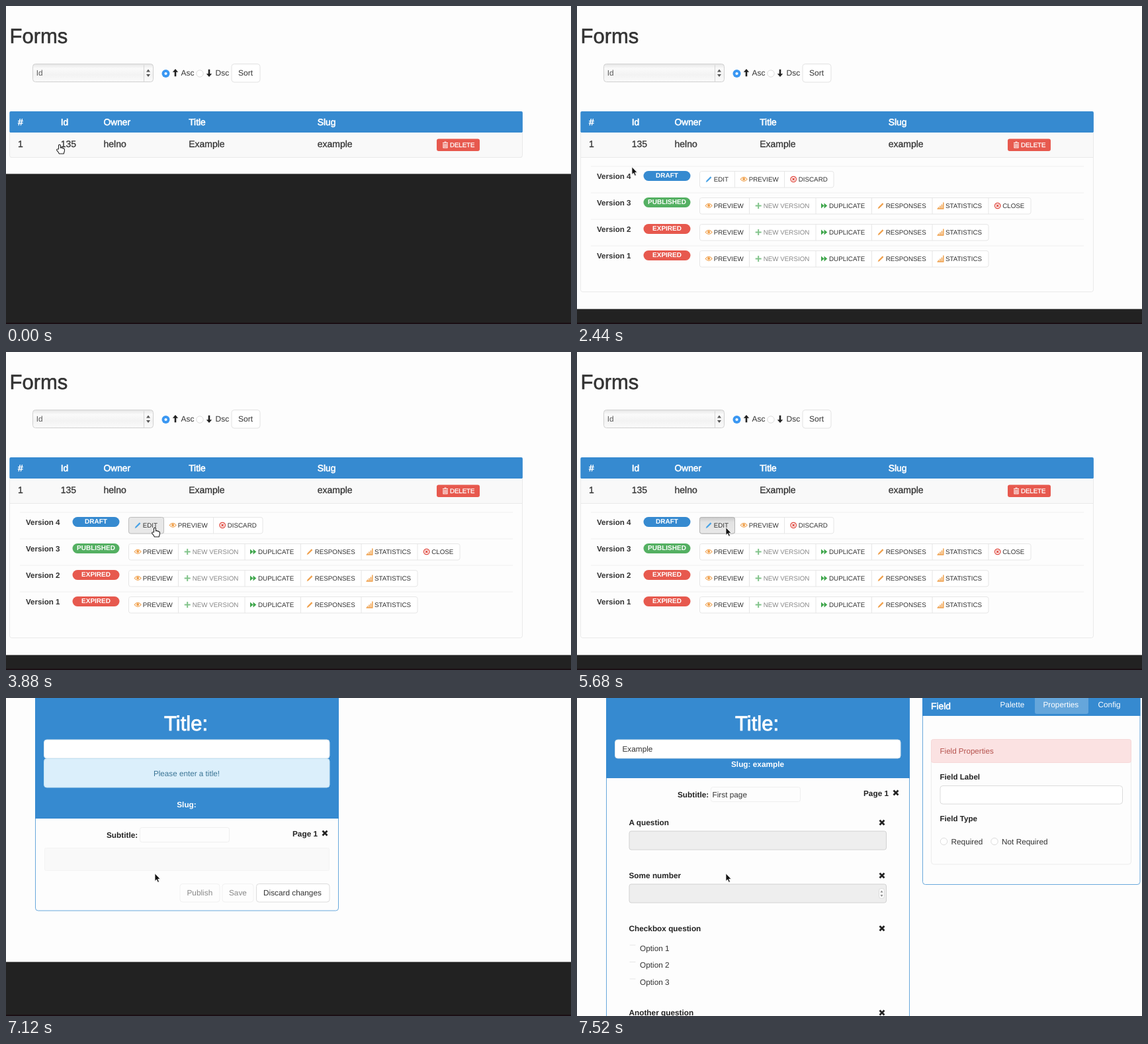
Recreate the animation shown at these times as an HTML page. Size 854 by 480 pixels, loop 8 s.

```html
<!DOCTYPE html>
<html lang="en">
<head>
<meta charset="utf-8">
<title>Form versions</title>
<style>
  html, body { margin: 0; width: 100%; height: 100%; overflow: hidden; background: #222; }
  #stage { position: relative; width: 854px; height: 480px; overflow: hidden; }
  .scene { position: absolute; inset: 0; background: linear-gradient(#222 478px, #1b0f14 478px); }
  .page { position: absolute; left: 0; top: 0; width: 854px; background: #fdfdfd; border-bottom: 1px solid #777; overflow: hidden; }
  svg { position: absolute; left: 0; top: 0; display: block; overflow: visible; filter: blur(.35px); }
  text { font-family: "Liberation Sans", Arial, sans-serif; white-space: pre; text-rendering: geometricPrecision; }

  .scene, .side, .hover, .pressed, .hand, .arrow { animation: 8s step-end infinite; }
  #list { animation-name: list; }
  #empty { animation-name: empty; }
  #filled { animation-name: filled; }
  .side { animation-name: side; }
  .hover { animation-name: hover; }
  .pressed { animation-name: pressed; }
  .hand { animation-name: hand; }
  .arrow { animation-name: arrow; }
  @keyframes list { 0% { opacity: 1 } 77%, 100% { opacity: 0 } }
  @keyframes empty { 0% { opacity: 0 } 89%, 100% { opacity: 1 } }
  @keyframes side { 0% { opacity: 0 } 89.5%, 100% { opacity: 1 } }
  @keyframes filled { 0% { opacity: 0 } 92%, 100% { opacity: 1 } }
  @keyframes hover { 0% { opacity: 0 } 46.5%, 100% { opacity: 1 } }
  @keyframes pressed { 0% { opacity: 0 } 59.5%, 100% { opacity: 1 } }
  @keyframes hand { 0% { opacity: 1 } 6% { opacity: 0 } 46.5% { opacity: 1 } 61.5%, 100% { opacity: 0 } }
  @keyframes arrow { 0% { opacity: 0 } 6% { opacity: 1 } 46.5% { opacity: 0 } 61.5%, 100% { opacity: 1 } }

  #list .page { animation: page 8s ease infinite; }
  .panel { position: absolute; left: 5px; top: 191px; width: 776px; border-radius: 0 0 4px 4px; overflow: hidden; animation: panel 8s ease infinite; }
  .panel::after { content: ""; position: absolute; inset: 0; border: 1px solid #eaeaea; border-top: 0; border-radius: 0 0 4px 4px; }
  @keyframes page { 0%, 5.6% { height: 253px } 10.4%, 100% { height: 457px } }
  @keyframes panel { 0%, 5.6% { height: 38px } 10.4%, 100% { height: 241px } }

  #cursor { animation: move 8s linear infinite; }
  @keyframes move {
    0%, 1% { transform: translate(81px, 209px) }
    4%, 19% { transform: translate(91px, 207px); animation-timing-function: ease-in-out }
    26%, 28% { transform: translate(89px, 252px) }
    30.5% { transform: translate(83px, 243px) }
    34.5% { transform: translate(52px, 258px); animation-timing-function: ease-out }
    38.5%, 39% { transform: translate(31px, 290px); animation-timing-function: ease-in }
    43.75% { transform: translate(105px, 294px); animation-timing-function: ease-out }
    48.5%, 100% { transform: translate(225px, 265px) }
  }
</style>
</head>
<body>
<div id="stage">
  <div class="scene" style="animation: none"><div class="page" style="height: 407px"></div></div>
  <div class="scene" id="empty"><div class="page" style="height: 398px"></div><svg width="854" height="480"></svg></div>
  <div class="scene" id="filled"><div class="page" style="height: 480px"></div><svg width="854" height="480"></svg></div>
  <svg class="side" width="854" height="480"></svg>
  <div class="scene" id="list">
    <div class="page">
      <svg class="top" width="854" height="480"></svg>
      <div class="panel"><svg class="rows" width="776" height="241" viewBox="5 191 776 241"></svg></div>
    </div>
  </div>
  <svg width="854" height="480">
    <defs>
      <linearGradient id="gloss" x2="0" y2="1">
        <stop offset="0" stop-color="#e6e6e6"/><stop offset=".25" stop-color="#fafafa"/>
        <stop offset=".6" stop-color="#f3f3f3"/><stop offset="1" stop-color="#fafafa"/>
      </linearGradient>
      <linearGradient id="inset" x2="0" y2="1">
        <stop offset="0" stop-color="#cacaca"/><stop offset=".3" stop-color="#e3e3e3"/><stop offset="1" stop-color="#e8e8e8"/>
      </linearGradient>
      <path id="pencil" d="M-4.5 4.8 -3.5 2 2.6-4.2 4.2-2.6-1.9 3.6Z" fill="currentColor"/>
      <g id="eye" fill="none" stroke="currentColor"><path d="M-5 0Q0-6.5 5 0 0 6 -5 0Z" stroke-width="1.1"/><circle r="1.6" cy="-.3" fill="currentColor"/></g>
      <path id="plus" d="M-4.5 0H4.5M0-4.5V4.5" stroke="currentColor" stroke-width="2"/>
      <path id="forward" d="M-4.5-4 0 0V-4L4.8 0 0 4V0L-4.5 4Z" fill="currentColor"/>
      <path id="bars" d="M-5 4.5H5M-3 4V2M-.5 4V0M2 4V-2M4.3 4V-5" stroke="currentColor" stroke-width="1.5"/>
      <g id="ban" fill="none" stroke="currentColor" stroke-width="1.3"><circle r="4.2"/><path d="M-1.7-1.7 1.7 1.7M1.7-1.7-1.7 1.7"/></g>
      <path id="cross" d="M-3.5-3.5 3.5 3.5M3.5-3.5-3.5 3.5" stroke="currentColor" stroke-width="2.7"/>
      <path id="up" d="M0-6 4.2-1.3H1.3V5.3H-1.3V-1.3H-4.2Z" fill="currentColor"/>
      <path id="trash" d="M-4-3H4M-1.5-4.5H1.5M-3-2V4.5H3V-2M-1-1.5V3.5M1-1.5V3.5" fill="none" stroke="currentColor" stroke-width="1.1"/>
    </defs>
    <g id="cursor">
      <path class="arrow" d="M0-.3V11.5L2.6 9.1 4.5 13.3 6.5 12.4 4.7 8.3H8.2Z" fill="#111" stroke="#fff" stroke-width=".8"/>
      <path class="hand" d="M-1.5 7V1.2Q0-.8 1.4 1.2V5Q3 4 4 5.6 5.4 4.8 6 6.3 7.3 6 7.4 7.6V10Q6.8 12 6.2 14H-.6Q-1.6 11.5-4.2 8.8-4.8 7-3 7Z" fill="#fff" stroke="#222" stroke-width="1.1"/>
    </g>
  </svg>
</div>
<script>
const BLUE = '#368ad0', RED = '#e7594e', GREEN = '#54b062', ORANGE = '#f0a04b', INK = '#333';

const rect = (x, y, w, h, fill, stroke = 'none', r = 4) =>
  `<rect x="${x}" y="${y}" width="${w}" height="${h}" rx="${r}" fill="${fill}" stroke="${stroke}"/>`;
const text = (x, y, s, size = 11.8, fill = INK, extra = '') =>
  `<text x="${x}" y="${y}" font-size="${size}" fill="${fill}" ${extra}>${s}</text>`;
const bold = (x, y, s, size = 11.8, fill = '#222', extra = '') =>
  text(x, y, s, size, fill, 'font-weight="700" ' + extra);
const medium = (x, y, s, size, fill, weight = .6) =>
  text(x, y, s, size, fill, `stroke="${fill}" stroke-width="${weight}"`);
const icon = (id, x, y, color, more = '') =>
  `<use href="#${id}" color="${color}" transform="translate(${x} ${y}) ${more}"/>`;
const line = (d, stroke, width = 1) => `<path d="${d}" fill="none" stroke="${stroke}" stroke-width="${width}"/>`;
const radio = (x, y) => `<circle cx="${x}" cy="${y}" r="5.2" fill="#fff" stroke="#dcdcdc"/>`;
const cross = (x, y) => icon('cross', x, y, '#222');
const fill = (selector, ...parts) => document.querySelector(selector).innerHTML = parts.flat().join('');

// List page: heading, sort bar, table
const columns = [[18, '#', '1'], [82.7, 'Id', '135'], [147.5, 'Owner', 'helno'], [276.2, 'Title', 'Example'], [470.7, 'Slug', 'example']];

fill('.top',
  medium(5.5, 56, 'Forms', 31, INK, .6),
  rect(40.5, 87.5, 182, 27, 'url(#gloss)', '#d0d0d0'),
  line('M208.5 89V114', '#d6d6d6'),
  '<path d="M212 99.5 215 95.5 218 99.5ZM212 103 215 107 218 103Z" fill="#555"/>',
  text(45.7, 105, 'Id', 11.8, '#5a5a5a'),
  '<circle cx="241.5" cy="102" r="6" fill="#3a97f2"/><circle cx="241.5" cy="102" r="2.1" fill="#fff"/>',
  icon('up', 256, 101, '#222'), text(264.5, 105, 'Asc', 12),
  radio(293, 102),
  icon('up', 307, 101, '#222', 'rotate(180)'), text(316.5, 105, 'Dsc', 12),
  rect(341, 87.5, 43, 27.5, '#fff', '#e2e2e2'), text(351, 105, 'Sort', 12),
  rect(5.3, 159, 775.6, 32.2, BLUE, 'none', 2),
  columns.map(([x, head]) => medium(x, 180, head, 13.8, '#fff')));

const buttons = {
  edit: ['EDIT', 'pencil', '#4aa3e6'],
  preview: ['PREVIEW', 'eye', ORANGE],
  discard: ['DISCARD', 'ban', '#e0483e'],
  fresh: ['NEW VERSION', 'plus', '#82c48b', '#888'],
  copy: ['DUPLICATE', 'forward', '#3fa64c'],
  replies: ['RESPONSES', 'pencil', ORANGE],
  stats: ['STATISTICS', 'bars', ORANGE],
  close: ['CLOSE', 'ban', '#e0483e']
};

function buttonGroup(y, edges, names) {
  const last = edges[names.length];
  const label = (name, i) => {
    const [caption, glyph, color, ink = INK] = buttons[name];
    const x = edges[i] + (name === 'copy' || name === 'stats' ? 20 : 21.2);
    return icon(glyph, x - 7.5, y + 12, color) + text(x, y + 15.5, caption, 9.8, ink);
  };
  return rect(185.5, y, last - 185.5, 24.5, '#fff', '#e6e6e6', 3) +
    edges.slice(1, names.length).map(x => line(`M${x} ${y}v24.5`, '#e6e6e6')).join('') +
    (names[0] === 'edit'
      ? `<g class="hover">${rect(185.5, y, 53, 24.5, '#e8e8e8', '#bcbcbc', 3)}</g>` +
        `<g class="pressed">${rect(185.5, y, 53, 24.5, 'url(#inset)', '#b4b4b4', 3)}</g>` : '') +
    names.map(label).join('');
}

const draftEdges = [185.5, 238.5, 313.5, 388];
const wideEdges = [185.5, 260.5, 361, 445.5, 537, 622, 686];
const common = ['preview', 'fresh', 'copy', 'replies', 'stats'];
const versions = [
  ['DRAFT', BLUE, draftEdges, ['edit', 'preview', 'discard']],
  ['PUBLISHED', GREEN, wideEdges, [...common, 'close']],
  ['EXPIRED', RED, wideEdges, common],
  ['EXPIRED', RED, wideEdges, common]
];

fill('.rows',
  rect(5, 191, 776, 37, '#f9f9f9', 'none', 0), line('M5 228.5H781', '#e9e9e9'),
  columns.map(([x, , cell]) => medium(x, 213.3, cell, 14, INK, .3)),
  rect(651, 200.5, 65, 18.5, RED, 'none', 3),
  icon('trash', 664, 209.5, '#fff'), medium(671, 213, 'DELETE', 9.6, '#fff', .3),
  versions.map(([state, color, edges, names], i) => {
    const y = 249 + i * 40;
    return line(`M21 ${y - 7}H766`, '#f0f0f0') +
      bold(30, y + 12.2, 'Version ' + (4 - i), 11.6, INK) +
      rect(100.5, y, 71, 15, color, 'none', 7.5) +
      bold(136, y + 9.7, state, 10, '#fff', 'text-anchor="middle"') +
      buttonGroup(y + .5, edges, names);
  }));

// Editor page
const editor = (bottom, header) =>
  rect(44.5, -10, 458, bottom + 10, '#fdfdfd', '#69a8dc') +
  rect(44, -10, 459, header + 10, BLUE, 'none', 0) +
  medium(239, 49, 'Title:', 31, '#fff', .9) +
  rect(57.5, 63, 431.5, 28, '#fff', '#d9e4ec');
const subtitle = (y, value) =>
  bold(152, y, 'Subtitle:') + rect(202.5, y - 15.5, 135, 22, '#fdfdfd', '#efefef', 3) +
  text(204.5, y, value) + bold(433, y - 2.5, 'Page 1') + cross(482, y - 7);
const slug = (y, s) => bold(273, y, s, 11.8, '#fff', 'text-anchor="middle"');

fill('#empty svg',
  editor(321, 182),
  rect(57.5, 91.5, 431.5, 43.5, '#dbeffb', '#c3e2f2'),
  text(273, 117.5, 'Please enter a title!', 11.7, '#3b7596', 'text-anchor="middle"'),
  slug(164.5, 'Slug:'),
  subtitle(211, ''),
  rect(58.5, 226.5, 430, 34, '#f9f9f9', '#f4f4f4', 2),
  rect(263, 280.5, 60, 27.5, '#fdfdfd', '#f1f1f1'), text(273.5, 298, 'Publish', 11.8, '#888'),
  rect(327, 280.5, 47, 27.5, '#fdfdfd', '#f1f1f1'), text(337, 298, 'Save', 11.8, '#888'),
  rect(378.5, 280.5, 110.5, 27.5, '#fff', '#dcdcdc'), text(389, 298, 'Discard changes'));

const question = (y, s) => bold(78.5, y, s) + cross(461, y - 4);
const field = y => rect(79, y, 388.5, 28, '#eee', '#d2d2d2', 3);

fill('#filled svg',
  editor(520, 121),
  text(68.5, 81, 'Example'),
  slug(104, 'Slug: example'),
  subtitle(150, 'First page'),
  question(192, 'A question'), field(201),
  question(272, 'Some number'), field(281),
  rect(456.5, 287.5, 8, 15, '#fafafa', '#ddd', 3),
  '<path d="M458.5 293.5 460.5 290.5 462.5 293.5ZM458.5 297 460.5 300 462.5 297Z" fill="#888"/>',
  question(351.7, 'Checkbox question'),
  [1, 2, 3].map(n => line(`M79.5 ${347.5 + n * 25.5}h9`, '#e6e6e6') + text(95, 356 + n * 25.5, 'Option ' + n)),
  question(479, 'Another question'));

fill('.side',
  rect(522.5, -10, 328.5, 291.5, '#fdfdfd', '#69a8dc'),
  rect(522, -10, 329.5, 37, BLUE, 'none', 0),
  rect(692, -4, 81, 28, '#65a6db', 'none', 3),
  medium(535, 17, 'Field', 13.8, '#fff'),
  text(639.5, 14, 'Palette', 11.8, '#fff'), text(704.5, 14, 'Properties', 11.8, '#fff'), text(787.5, 14, 'Config', 11.8, '#fff'),
  rect(535.5, 62.5, 302, 188.5, '#fdfdfd', '#ececec'),
  rect(535.5, 62.5, 302, 35, '#fbe2e2', '#f6d8d8', 3),
  text(548.5, 84, 'Field Properties', 11.6, '#b5524d'),
  bold(548.5, 123, 'Field Label', 11.6), rect(549, 132.5, 275.5, 27.5, '#fff', '#dcdcdc'),
  bold(548.5, 186, 'Field Type', 11.6),
  radio(554.5, 216.5), text(565.5, 220.8, 'Required'),
  radio(631, 216.5), text(642, 220.8, 'Not Required'));
</script>
</body>
</html>
```
